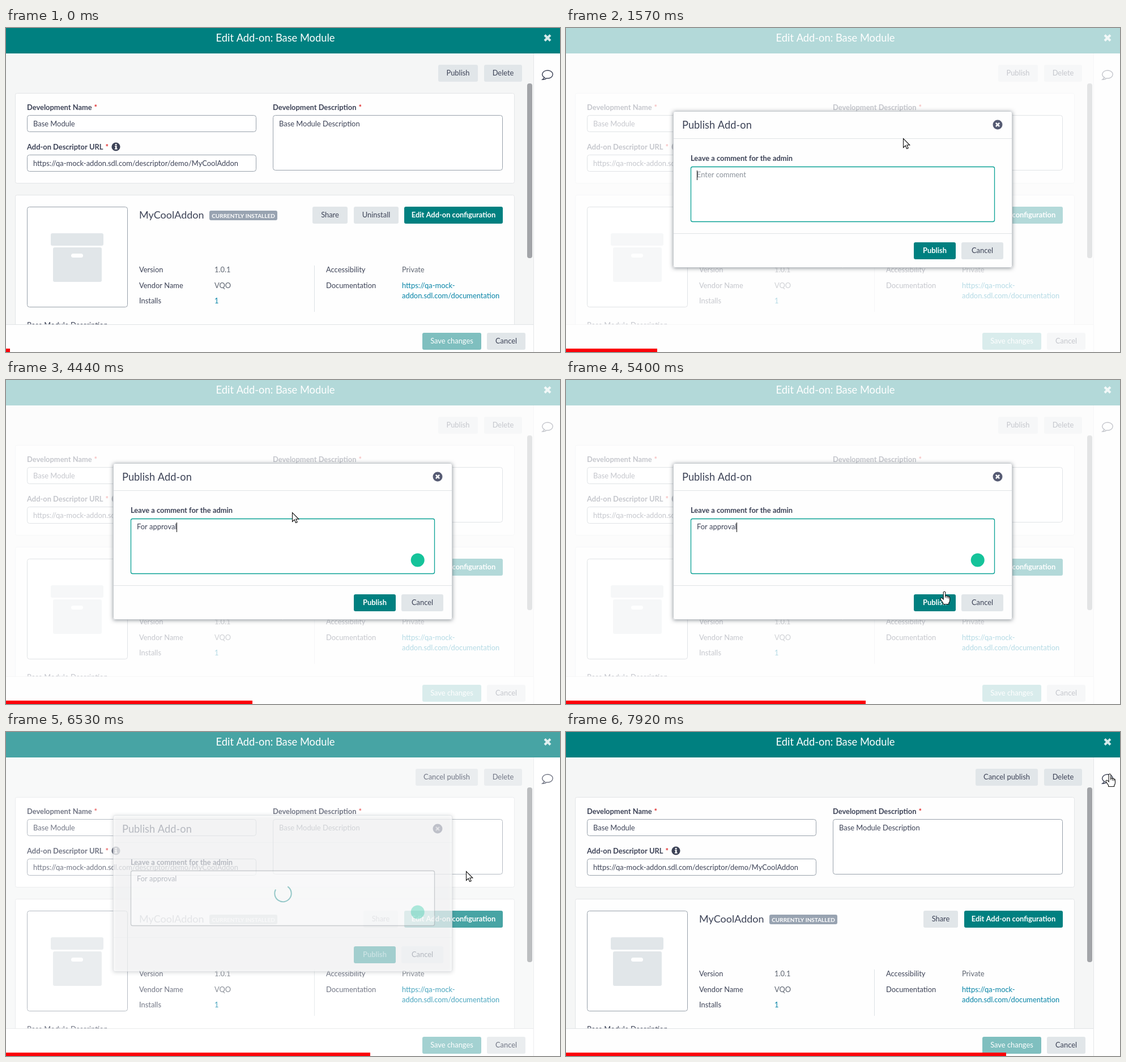
These frames come from a looping animation (978 px wide and 573 px high, 7990 ms). An HTML page with a canvas:

```html
<!DOCTYPE html>
<html lang="en">
<head>
<meta charset="utf-8">
<title>Publish an add-on</title>
<style>
  html, body { margin: 0; width: 100%; height: 100%; overflow: hidden; background: #fff; }
  canvas { display: block; }
</style>
</head>
<body>
<canvas id="stage" width="978" height="573"></canvas>
<script>
const W = 978, H = 573, LOOP = 7990;
const ctx = document.getElementById('stage').getContext('2d');

const NAME = 'Base Module';
const COMMENT = 'For approval';
const TEAL = '#008080', INK = '#3d4357', SOFT = '#5f6672', LINK = '#0583a6';
const GREY = '#e1e6e9', BORDER = '#98a1ab', WHITE = '#ffffff';

const TICKS = [[0, 0, 1], [70, 820, 12], [890, 1640, 12], [1710, 2470, 12], [2540, 3320, 12],
  [3390, 4160, 12], [4230, 4990, 12], [5050, 5840, 13], [5910, 6670, 12], [6740, 7510, 12], [7580, 7920, 6]]
  .flatMap(([a, b, n]) => Array.from({ length: n }, (_, i) => Math.round((a + (b - a) * i / Math.max(1, n - 1)) / 10) * 10));

const KEYS = [2560, 2750, 2920, 3000, 3130, 3270, 3420, 3600, 3760, 3920, 4080, 4250];
const OPEN = 960, SUBMIT = 5600, CLOSE = 6440, TOAST = 6540;

// Pointer path: [time, x, y]
const PATH = [[70, 880, 58], [600, 800, 76], [1080, 798, 80], [1570, 595, 195], [1650, 560, 232],
  [1900, 505, 234], [4930, 505, 234], [5450, 677, 381], [6290, 677, 381], [6670, 872, 186],
  [6810, 907, 152], [7400, 960, 74]];
const HANDS = [[540, 1100], [5330, SUBMIT], [7280, LOOP]];

const ramp = (t, a, b) => Math.min(1, Math.max(0, (t - a) / (b - a)));
const ease = u => u * u * (3 - 2 * u);

function box(x, y, x2, y2, fill, stroke, r = 3, line = 1) {
  ctx.beginPath();
  const o = stroke ? 0.5 : 0;
  ctx.roundRect(x + o, y + o, x2 - x - 2 * o, y2 - y - 2 * o, r);
  if (fill) { ctx.fillStyle = fill; ctx.fill(); }
  if (stroke) { ctx.strokeStyle = stroke; ctx.lineWidth = line; ctx.stroke(); }
}

function rect(x, y, w, h, fill) {
  ctx.fillStyle = fill;
  ctx.fillRect(x, y, w, h);
}

function text(s, x, y, { color = INK, size = 12.9, weight = 400, align = 'left', font = 'Lato, Carlito' } = {}) {
  ctx.font = `${weight} ${size}px ${font}, sans-serif`;
  ctx.textAlign = align;
  ctx.fillStyle = color;
  ctx.fillText(s, x, y);
  return x + ctx.measureText(s).width;
}

function button(label, x, y, x2, fill = GREY, color = INK, weight = 400) {
  box(x, y, x2, y + 30, fill, null, 3);
  text(label, (x + x2) / 2, y + 19, { color, weight, align: 'center' });
}

function dot(x, y, r, fill) {
  ctx.beginPath();
  ctx.arc(x, y, r, 0, 7);
  ctx.fillStyle = fill;
  ctx.fill();
}

function lines(points, color, width) {
  ctx.beginPath();
  points.forEach(([x, y], i) => i ? ctx.lineTo(x, y) : ctx.moveTo(x, y));
  ctx.strokeStyle = color;
  ctx.lineWidth = width;
  ctx.stroke();
}

function cross(x, y, r, color, width) {
  lines([[x - r, y - r], [x + r, y + r]], color, width);
  lines([[x - r, y + r], [x + r, y - r]], color, width);
}

function label(s, x, y) {
  const end = text(s, x, y, { weight: 700 });
  text('*', end + 4, y, { weight: 700, color: '#e02828' });
}

function bubble(x, y) {
  ctx.beginPath();
  ctx.ellipse(x, y - 1, 9.3, 7, 0, Math.PI * 0.64, Math.PI * 2.56);
  ctx.quadraticCurveTo(x - 4, y + 8, x - 9, y + 8.2);
  ctx.quadraticCurveTo(x - 6, y + 6, x - 6, y + 4);
  ctx.strokeStyle = INK;
  ctx.lineWidth = 1.4;
  ctx.stroke();
}

function drawForm() {
  box(16, 115, 898, 275, '#fefefe', '#e3e5e7');
  label('Development Name', 37, 145);
  box(37, 154, 442, 184, WHITE, BORDER, 4);
  text(NAME, 48, 174);
  label('Add-on Descriptor URL', 37, 215);
  dot(194, 210, 7.6, INK);
  rect(192.7, 205, 2.8, 2.4, WHITE);
  rect(192, 208.6, 3.5, 1.6, WHITE);
  rect(193, 208.6, 2.5, 5.6, WHITE);
  rect(191.8, 213, 4.8, 1.6, WHITE);
  box(37, 224, 442, 254, WHITE, BORDER, 4);
  text('https://qa-mock-addon.sdl.com/descriptor/demo/MyCoolAddon', 48, 244);
  label('Development Description', 471, 145);
  box(471, 154, 877, 252, WHITE, BORDER, 4);
  text(NAME + ' Description', 482, 174);
}

function drawDetails(sent) {
  box(16, 295, 898, 560, '#fefefe', '#e3e5e7');
  box(37, 316, 215, 494, WHITE, BORDER, 4);
  box(79, 363, 172, 385, GREY);
  box(83, 388, 169, 449, GREY);
  box(115, 399, 136, 406, WHITE, null, 3.5);
  text('MyCoolAddon', 235, 337, { size: 18 });
  box(359, 323, 479, 340, '#98a3b1');
  text('CURRENTLY INSTALLED', 419, 335.5, { size: 10, weight: 700, color: WHITE, align: 'center' });

  if (sent) {
    button('Share', 631, 316, 692);
  } else {
    button('Share', 541, 316, 603);
    button('Uninstall', 614, 316, 693);
  }
  button('Edit Add-on configuration', 703, 316, 877, TEAL, WHITE, 700);

  [['Version', '1.0.1'], ['Vendor Name', 'VQO'], ['Installs', '1']].forEach(([key, value], i) => {
    const y = 432 + Math.round(i * 27.7);
    text(key, 235, y);
    text(value, 368, y, { color: i === 2 ? LINK : SOFT });
  });
  rect(544, 420, 1, 82, '#dde1e5');
  text('Accessibility', 565, 432);
  text('Private', 699, 432, { color: SOFT });
  text('Documentation', 565, 460);
  text('https://qa-mock-', 699, 460, { color: LINK });
  text('addon.sdl.com/documentation', 699, 478, { color: LINK });
  text(NAME + ' Description', 37, 530);
}

function drawPage(sent) {
  rect(0, 0, W, H, '#f5f6f6');
  if (sent) button('Cancel publish', 723, 65, 833);
  else button('Publish', 763, 65, 833);
  button('Delete', 844, 65, 911);
  drawForm();
  drawDetails(sent);
  box(920, 98, 929, 407, '#a2a4a8', null, 4);

  rect(0, 524, 932, 49, '#fefefe');
  rect(0, 524, 932, 1, '#e0e3e5');
  button('Save changes', 735, 539, 839, '#7fbfbf', WHITE);
  button('Cancel', 849, 539, 917);

  rect(932, 45, 46, 528, '#fefefe');
  rect(931, 45, 1, 528, '#e4e6e8');
  bubble(956, 83);
  rect(0, 0, W, 45, TEAL);
  text('Edit Add-on: ' + NAME, 475.5, 24, { size: 18.3, color: WHITE, align: 'center' });
  cross(956, 17.5, 5, '#d5eaea', 4);
}

function caretOn(t) {
  if (t >= SUBMIT) return false;
  const last = KEYS.filter(k => k <= t).pop() || 1100;
  return Math.floor((t - last) / 530) % 2 === 0;
}

function drawModal(t) {
  ctx.save();
  ctx.shadowColor = 'rgba(40,50,60,0.5)';
  ctx.shadowBlur = 7;
  ctx.shadowOffsetY = 1;
  box(189, 147, 788, 424, WHITE);
  ctx.restore();
  box(189, 147, 788, 424, '#fefefe', '#c9cdd1');
  rect(190, 195, 597, 1, '#e0e3e6');
  rect(190, 363, 597, 1, '#e0e3e6');
  text('Publish Add-on', 205, 178, { size: 18.3 });
  dot(762, 171, 8.5, '#565b73');
  cross(762, 171, 3.1, WHITE, 2.6);

  text('Leave a comment for the admin', 220, 235, { weight: 700 });
  box(220, 245, 757, 343, WHITE, t < SUBMIT ? '#08a094' : '#6f7780', 3, 1.3);
  const typed = COMMENT.slice(0, KEYS.filter(k => k <= t).length);
  let end = 231;
  if (typed) end = text(typed, 231, 264);
  else text('Enter comment', 231, 264, { color: '#8b929b' });
  if (caretOn(t)) rect(Math.round(end), 252, 1, 17, '#111');
  if (t >= 2300) dot(726.7, 318.5, 12, '#15c39a');

  button('Publish', 614, 379, 688, TEAL, WHITE, 700);
  button('Cancel', 698, 379, 772);

  const dim = ramp(t, SUBMIT, SUBMIT + 150);
  if (dim > 0) {
    box(190, 148, 787, 423, `rgba(255,255,255,${0.4 * dim})`);
    const turn = (t - 6250) / 1000 * Math.PI * 2;
    ctx.beginPath();
    ctx.arc(489, 285.5, 14.7, Math.PI * 1.13 + turn, Math.PI * 2.6 + turn);
    ctx.strokeStyle = TEAL;
    ctx.lineWidth = 2;
    ctx.stroke();
  }
}

function drawToast() {
  const color = '#129a92', font = '"Liberation Sans", Arial', size = 12;
  box(620, 38, 976, 105, '#e3f2f1', '#7fc0bc');
  dot(647.5, 62, 6.7, color);
  lines([[644, 62], [646.7, 64.7], [651.2, 59.6]], '#e3f2f1', 2);
  cross(960, 47.5, 4, color, 3);
  let x = text('The Add-on, ', 664, 67, { color, font, size });
  x = text(NAME, x, 67, { color, font, size, weight: 700 });
  text(', was successfully sent for', x, 67, { color, font, size });
  text('publish approval review', 641, 81, { color, font, size });
}

function pointerAt(t) {
  const i = PATH.findIndex(p => p[0] > t);
  if (i < 0) return PATH[PATH.length - 1].slice(1);
  const [t0, x0, y0] = PATH[i - 1], [t1, x1, y1] = PATH[i];
  const u = ease(ramp(t, t0, t1));
  return [x0 + (x1 - x0) * u, y0 + (y1 - y0) * u];
}

const ARROW = new Path2D('M.5 .5V16.5L4.2 13L6.6 18.5L9.2 17.4L6.8 12H11.8Z');
const HAND = new Path2D('M-1.8 1.5Q0 -1.5 1.8 1.5V8Q3.5 6.8 4.8 8.4Q6.6 7.4 7.4 9.3Q9.3 8.8 9.5 11V16' +
  'Q9.3 19 7.7 20.5V22.5H-2.3V20.5L-6.3 14.5Q-7.8 11.8 -5.6 11.3Q-4.2 11 -1.8 14Z');

function drawPointer(t) {
  if (t < PATH[0][0]) return;
  const [x, y] = pointerAt(t);
  const hand = HANDS.some(([a, b]) => t >= a && t < b);
  const shape = hand ? HAND : ARROW;
  ctx.save();
  ctx.translate(Math.round(x), Math.round(y));
  ctx.fillStyle = WHITE;
  ctx.strokeStyle = '#111';
  ctx.lineWidth = 1.1;
  ctx.fill(shape);
  ctx.stroke(shape);
  if (hand) {
    lines([[1.8, 7], [1.8, 11]], '#111', 1);
    lines([[4.8, 8.5], [4.8, 12]], '#111', 1);
    lines([[7.4, 9.5], [7.4, 12.5]], '#111', 1);
  }
  ctx.restore();
}

// Paints a modal layer, fading it as one
function faded(alpha, paint) {
  if (alpha <= 0) return;
  ctx.save();
  ctx.globalAlpha = alpha;
  paint();
  ctx.restore();
}

function draw(t, tick) {
  drawPage(t >= CLOSE + 80);
  const shown = ramp(t, OPEN, OPEN + 250) * (1 - ramp(t, CLOSE, CLOSE + 150));
  faded(shown * 0.7, () => rect(0, 0, W, H, WHITE));
  faded(shown, () => drawModal(t));
  faded(ramp(t, TOAST, TOAST + 120) * (1 - ramp(t, 7100, 7620)), drawToast);
  drawPointer(t);
  rect(0, 567, Math.round(6.695 * (tick + 1)), 6, '#fb0007');
}

function loop() {
  const now = performance.now() % LOOP;
  const next = TICKS.findIndex(t => t > now);
  const tick = (next < 0 ? TICKS.length : next) - 1;
  draw(TICKS[tick], tick);
  requestAnimationFrame(loop);
}
loop();
</script>
</body>
</html>
```
